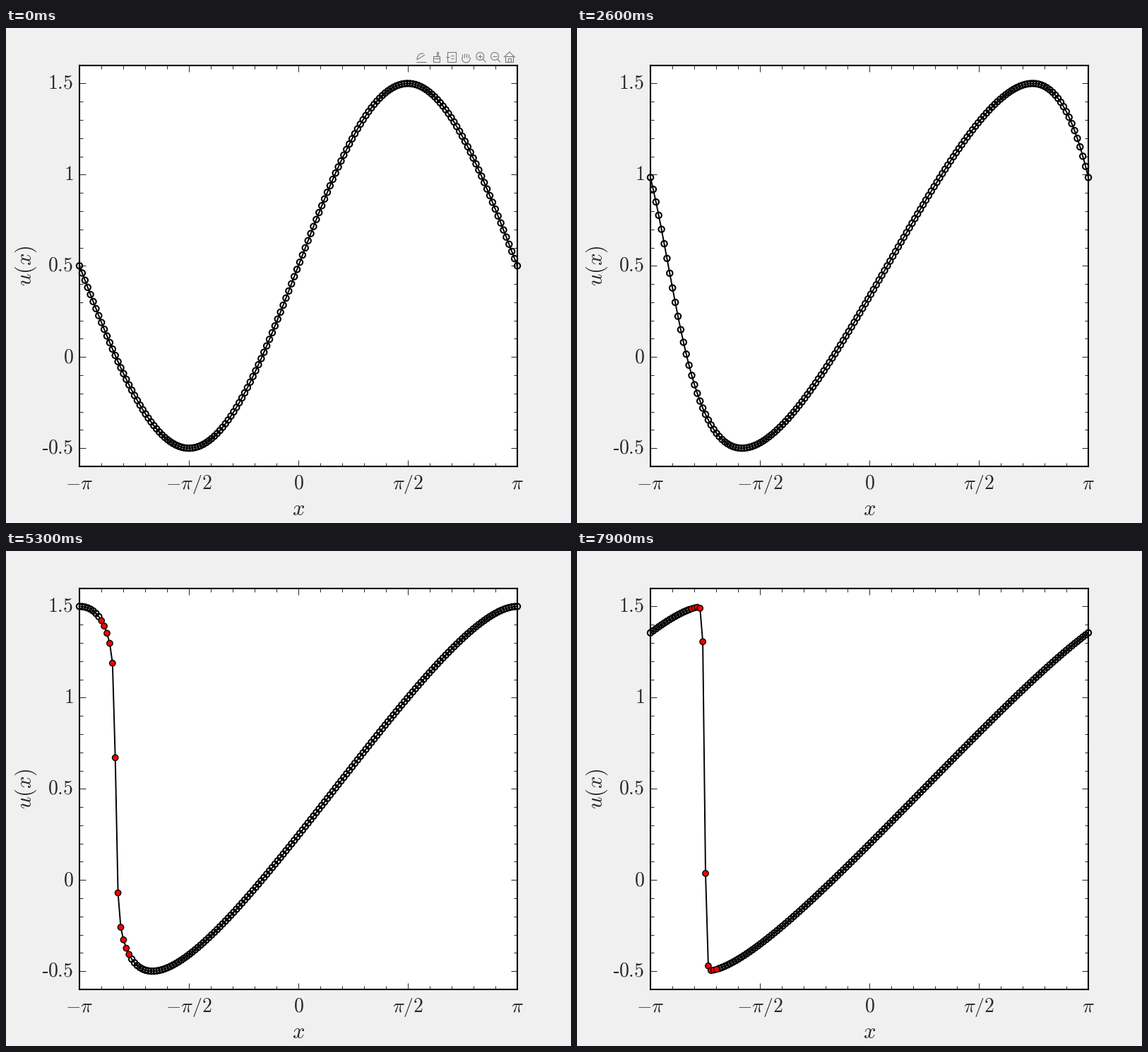
Animation, 800 px wide and 700 px high, one loop 8000 ms. Source, as a matplotlib script:

```python
import numpy as np
import matplotlib.pyplot as plt
from matplotlib.animation import FuncAnimation
from matplotlib.collections import LineCollection
from matplotlib.ticker import MultipleLocator

W, H, DPI = 800, 700, 100
FRAMES, INTERVAL = 80, 100
POINTS = 160
PX = 72 / DPI
LEFT, RIGHT, TOP, BOTTOM = 104, 724, 52.6, 620
INK, ICON = "#262626", "#7a7a7a"

plt.rcParams["mathtext.fontset"] = "cm"
plt.rcParams["toolbar"] = "None"

x = np.linspace(-np.pi, np.pi, POINTS)
dx = x[1] - x[0]
dt = dx / 2


def solve(n):
    """Inviscid Burgers flow from u = 0.5 + sin(x), with a smeared shock."""
    t = n * dt
    y = np.remainder(x + 2 * np.pi - t / 2, 2 * np.pi) - np.pi
    # Foot of each characteristic: z - t sin(z) = |y|, outer root
    lo = np.full(POINTS, np.arccos(1 / t) if t > 1 else 0.0)
    hi = np.full(POINTS, np.pi)
    for _ in range(45):
        mid = (lo + hi) / 2
        low = mid - t * np.sin(mid) < np.abs(y)
        lo, hi = np.where(low, mid, lo), np.where(low, hi, mid)
    steep = np.clip((t - 0.9) / 0.14, 0, 1)
    d = y / dx + 0.06 * steep
    smear = np.abs(np.tanh(1.62 * d)) ** steep
    return 0.5 - np.sign(d) * np.sin(lo) * smear


def flagged(n):
    """Mask of the stencil around the steep faces of this and the last step."""
    i = np.arange(POINTS)
    first = np.floor((n - 1) / 4 - 0.01)
    return (n > 30) & (i >= first - 4) & (i <= n // 4 + 5)


fig = plt.figure(figsize=(W / DPI, H / DPI), dpi=DPI, facecolor="#f0f0f0")
ax = fig.add_axes([LEFT / W, 1 - BOTTOM / H,
                   (RIGHT - LEFT) / W, (BOTTOM - TOP) / H])
ax.set_xlim(-np.pi, np.pi)
ax.set_ylim(-0.6, 1.6)
ax.xaxis.set_major_locator(MultipleLocator(np.pi / 2))
ax.xaxis.set_minor_locator(MultipleLocator(np.pi / 10))
ax.yaxis.set_major_locator(MultipleLocator(0.5))
ax.yaxis.set_minor_locator(MultipleLocator(0.1))
for which, size in (("major", 9), ("minor", 5)):
    ax.tick_params(which=which, direction="in", length=size * PX, width=PX,
                   color=INK, top=True, right=True,
                   labelbottom=False, labelleft=False)
for spine in ax.spines.values():
    spine.set_linewidth(1.5)

# Overlay in pixels, y downwards
over = fig.add_axes([0, 0, 1, 1], facecolor="none")
over.set_xlim(0, W)
over.set_ylim(H, 0)
over.axis("off")


def label(px, py, tex, size=20, ha="center", rotation=0):
    over.text(px, py, f"${tex}$", fontsize=size, color=INK, ha=ha,
              va="baseline", rotation=rotation, rotation_mode="anchor")


for k, tex in enumerate((r"-\pi", r"-\pi/2", "0", r"\pi/2", r"\pi")):
    label(LEFT + 155 * k, 652, tex)
for k, tex in enumerate(("1.5", "1", "0.5", "0", "0.5")):
    label(95.5, 86 + 129 * k, tex, ha="right")
over.plot([51.5, 59], [595.5, 595.5], color=INK, lw=2 * PX,
          solid_capstyle="butt")
label(414, 689, "x", 22)
label(36, 336, "u(x)", 22, rotation=90)


def oval(cx, cy, rx, ry, start=0, end=360):
    a = np.radians(np.linspace(start, end, 25))
    return np.column_stack((cx + rx * np.cos(a), cy + ry * np.sin(a)))


def line(x0, y0, x1, y1):
    return [(x0, y0), (x1, y1)]


def rect(x0, y0, x1, y1):
    return [(x0, y0), (x1, y0), (x1, y1), (x0, y1), (x0, y0)]


def lens(cx):
    return [oval(cx, 40, 5.5, 5.5), line(cx + 4, 44, cx + 8, 48.5),
            line(cx - 3, 40, cx + 3, 40)]


def toolbar_strokes():
    share, brush, tip, hand, plus, minus, home = 588 + 20.8 * np.arange(7)
    return [
        oval(share + 1, 45, 7, 9, 180, 290), line(share - 6, 45, share + 5, 38),
        line(share - 7, 47.5, share + 7, 47.5),
        rect(brush + 1, 34, brush + 3, 40), rect(brush - 4, 40, brush + 5, 48),
        line(brush - 3, 43, brush + 5, 43),
        rect(tip - 5, 34, tip + 7, 48), line(tip - 7, 41, tip - 2, 41),
        line(tip, 39, tip + 4, 39), line(tip, 43, tip + 4, 43),
        oval(hand + 1, 42, 6, 7, 0, 180),
        *[line(hand - 4 + 3 * k, 42, hand - 4 + 3 * k, 35 + abs(k - 1.5))
          for k in range(4)],
        *lens(plus), line(plus, 37, plus, 43), *lens(minus),
        [(home - 8, 41.5), (home, 34), (home + 8, 41.5)],
        rect(home - 5.5, 40, home + 5.5, 48), rect(home - 2, 43, home + 2, 48),
    ]


toolbar = LineCollection(toolbar_strokes(), colors=ICON, linewidths=1.1 * PX)
over.add_collection(toolbar, autolim=False)

curve, = ax.plot([], [], "k-", lw=1.4, clip_on=False, zorder=4)
dots = ax.scatter(x, x * 0, s=36, c="none", edgecolors="black",
                  clip_on=False, zorder=5)


def draw(n):
    u, hot = solve(n), flagged(n)
    order = np.argsort(hot, kind="stable")
    hot = hot[order]
    curve.set_data(x, u)
    dots.set_offsets(np.column_stack((x, u))[order])
    dots.set_facecolor(np.outer(hot, (1, 0, 0, 1)))
    dots.set_linewidth(np.where(hot, 1.0, 1.5))
    toolbar.set_visible(n == 0)
    return curve, dots, toolbar


anim = FuncAnimation(fig, draw, frames=FRAMES, interval=INTERVAL,
                     repeat=True, repeat_delay=0)
plt.show()
```
